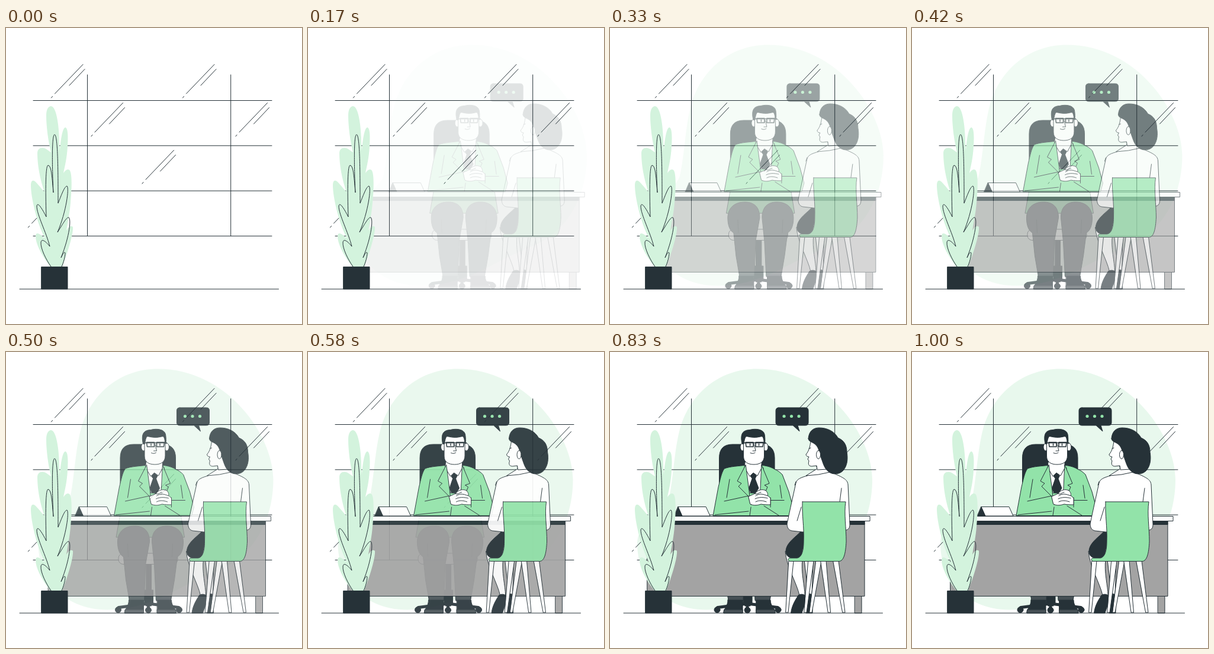
An HTML page that plays this animation: 500x500 px, repeating every 1040 ms.

```html
<!DOCTYPE html>
<html lang="en">
<head>
<meta charset="utf-8">
<title>Office meeting</title>
<style>
  html, body { margin: 0; height: 100%; overflow: hidden; background: #fff; }
  svg { display: block; width: 100vw; height: 100vh; }
  svg { stroke: #263238; stroke-linecap: round; stroke-linejoin: round; fill: none; }
  .dark { fill: #263238; }
  .white { fill: #fff; }
  .green { fill: #92e3a9; }
  .grey { fill: #a3a3a3; }
  .trousers { fill: #465055; }
  .flat { stroke: none; }
</style>
</head>
<body>
<svg viewBox="0 0 500 500">
  <defs>
    <path id="glint" d="M130 61.500L82.500 111M133 69.500L107 97M78.500 115.500L76.500 118"/>
  </defs>

  <g class="slide">
    <path class="flat" fill="#e8f8ed" d="M250 28.500C188 28.500 138 68 120 130C110 168 109 215 101 250C92 278 48 285 48 325C48 375 85 435.500 165 435.500C240 435.500 285 395 350 370C412 345 445 285 445 215C445 142 368 28.500 250 28.500Z"/>
  </g>

  <g id="window">
    <path d="M46 122.500H449M46 198.800H449M46 275.100H449M46 351.400H449M137.500 79V351M379.700 79V351"/>
    <use href="#glint"/>
    <use href="#glint" x="222"/>
    <use href="#glint" x="67.500" y="65"/>
    <use href="#glint" x="311.500" y="65"/>
    <use href="#glint" x="153.500" y="145"/>
    <use href="#glint" x="-39" y="219"/>
  </g>

  <g class="slide" id="man">
    <!-- office chair -->
    <path class="dark" d="M186.500 235V179Q186.500 156 209 156H257Q280 156 280 179V235Z"/>
    <rect class="white" x="183.500" y="340" width="100" height="18.500" rx="8"/>
    <path class="dark" d="M230 358.500H239V429H230ZM227 402H242V424H227Z"/>
    <path stroke-width="5" d="M234 425L184 431.500M234 425L285 431.500M234 424V433"/>
    <g class="dark">
      <circle cx="183" cy="435.500" r="5"/><circle cx="234" cy="436" r="5"/><circle cx="286" cy="435.500" r="5"/>
    </g>
    <!-- coat, trousers, shoes -->
    <path class="green" d="M187 270L179.500 313H295L288 270Z"/>
    <path class="trousers" d="M236 320C236 302 226 294 211 294C192 294 182 305 182 321C182 334 186 343 192 346L196 385L202 420H227L229 360Z"/>
    <path class="trousers" d="M240 320C240 302 250 294 265 294C283 294 293 305 293 321C293 334 289 343 283 346L278 385L272 420H247L244 360Z"/>
    <path d="M199 324L200 346M275 324L274 346"/>
    <path class="dark" d="M201 419H226V441H194C194 433 201 430 201 419Z"/>
    <path class="dark" d="M249 419H273C273 430 281 433 281 441H249Z"/>
    <path class="trousers" d="M195 435H226V441H194ZM249 435H280L281 441H249Z"/>
    <path class="green" d="M232 191C219 193 205 193 195 197C190 204 188 216 185 228L176 276.500H307L311 262L304 236L293 207C289 203 285 200 280 198C272 193 264 192 256 191Z"/>
    <!-- shirt and tie -->
    <path class="white" d="M232 191L229 196L238 238L258 238L261 196L257 191Z"/>
    <path class="dark" d="M239 209L244 204.500L249.500 209L247 214L253 230L248 238H240L236.500 230L242 214Z"/>
    <path class="white" d="M230 186L229 195L238 210L244 204L251 209L258 196V186Z"/>
    <path class="green" d="M231 191L217 218L224 222L219 227L238 246L237 235Z"/>
    <path class="green" d="M258 191L271 222L263 225L268 228L262 242L256 236Z"/>
    <path d="M204 215L199 246M195 252L236 243L240 258M179 275L236 269M273 246V262M273 250.500H296M289 225L292 247M262 260L287 276M240 262L238 276"/>
    <!-- clasped hands -->
    <path class="white" d="M236 244L247 239C251 233 259 231 265 234C268 237 269 240 268 242L273 247V258C268 258 262 258 257 257C251 259 245 260 239 257Z"/>
    <path d="M248 243C253 239 259 239 268 243M247 248C253 245 261 245 268 247M248 253C254 250 260 251 266 253M246 239C251 242 253 237 257 237"/>
    <!-- head -->
    <g class="white">
      <ellipse cx="226" cy="160.500" rx="4" ry="6.500"/>
      <ellipse cx="265" cy="160.500" rx="4" ry="6.500"/>
      <path d="M227.500 143V176C227.500 186 235 190 245 190C255 190 262.500 186 262.500 175V143Z"/>
    </g>
    <path class="dark" d="M225 155C222 141 224 132 238 131.500C247 129 261 130 263 139C264 145 264 150 263.500 155L262 153C262 148 261 145 259 142C248 146 238 144 232 142C229 146 229 150 228 155Z"/>
    <path stroke-width="1.600" d="M226 153.500H265M231 152.500H244V160H232ZM248 152.500H261L260 160H248Z"/>
    <path stroke-width="1.500" d="M238.500 155V158M253.500 155V158"/>
    <path d="M245.500 156L248 167L243 167M239 170.500C242 172 245 171.500 247 170"/>
  </g>

  <g class="slide" id="desk">
    <rect class="grey" x="415.500" y="412" width="11.500" height="29"/>
    <rect class="grey" x="65" y="286" width="367" height="126.500"/>
    <rect class="dark" x="65" y="286" width="367" height="5.500"/>
    <rect class="white" x="56" y="277.500" width="385" height="8"/>
    <path class="white" d="M117 261.500H164L171 277H124Z"/>
    <path class="dark" d="M117 261.500L124 277H110.500Z"/>
  </g>

  <g class="slide" id="woman">
    <!-- legs and chair legs -->
    <g class="white">
      <path d="M330 350L337 411H343L345 350Z"/>
      <path d="M298 337C300 362 318 392 322 411H331C331 395 324 372 327 350Z"/>
    </g>
    <path class="dark" d="M333 412C336 407 342 408 344 411V441H333C331 430 332 420 333 412Z"/>
    <path class="dark" d="M320 411C324 408 330 409 332 412C334 424 328 433 326 441H307.500C309 428 315 419 320 411Z"/>
    <g class="white">
      <path d="M304 353H312L303 440H299Z"/>
      <path d="M337 353H346L334 440H330Z"/>
      <path d="M350 353H359L343 440H339Z"/>
      <path d="M358 353H367L374.500 440H370.500Z"/>
      <path d="M379 353H388L399 440H395Z"/>
    </g>
    <path class="dark" d="M328 299C319 311 299 321 299 337C299 347 308 350 324 348L332 310Z"/>
    <!-- blouse -->
    <path class="white" d="M350 190L352 198L335 209C325 212 318 214 316 221L307 262L301 290C301 297 304 301 309 302L327 304L400 301C405 300 407 297 407 291L404 224C403 216 398 213 380 205L368 195Z"/>
    <path d="M393 230L390 253M316 219L314 225M325 262L318 285"/>
    <path class="white" d="M352 197L333 209L354 207L373 203L380 205L368 194Z"/>
    <!-- head -->
    <path class="white" d="M341 150C340 158 339 166 333 173C333 176 336 177 338 177L336 181L338 184C336 190 338 193 343 193L351 192L352 199L370 198L364 150Z"/>
    <path class="dark" d="M337 146C338 133 346 128 355 128C369 128 381 134 387 145C397 149 402 157 402 169C404 180 403 192 396 200C390 207 378 208 371 202C364 197 362 188 359 180L355 167C353 160 350 156 344 153C339 151 337 149 337 146Z"/>
    <ellipse class="white" cx="354" cy="173.500" rx="3.500" ry="7"/>
    <path d="M338 163L341 162"/>
    <!-- chair -->
    <path class="green" d="M327 253H400C397 273 401 298 401 320C400 340 397 353 389 353.500H306C302 353 302 348 306 348H318C325 347 329 338 329 320C330 295 326 275 327 253Z"/>
  </g>

  <g class="slide" id="bubble">
    <path class="dark" d="M287 94H332Q337 94 337 99V119Q337 124 332 124H319L322 134L311 124H287Q282 124 282 119V99Q282 94 287 94Z"/>
    <g class="green flat">
      <circle cx="296" cy="108.500" r="2.600"/><circle cx="308.500" cy="108.500" r="2.600"/><circle cx="321" cy="108.500" r="2.600"/>
    </g>
  </g>

  <g id="plant">
    <path class="flat" fill="#d3f3dd" d="M75 403C66 392 50 368 50 351C50 346 54 346 58 349C61 351 64 354 66 355C52 330 42 285 42 266C42 257 46 256 50 260C56 266 61 273 65 277C57 255 53 230 53 212C53 202 61 201 67 204C72 207 74 209 76 210C71 190 68 165 68 148C68 135 73 132 76 132C85 132 90 165 90 195L91 208C92 192 95 169 100 168C105 168 105 185 104 200C103 220 99 235 97 245C102 238 106 238 108 241C112 248 111 275 109 295C108 310 104 330 102 342C106 335 110 333 113 336C114 345 107 372 95 403Z"/>
    <path d="M76 403C68 392 58 372 59 362C60 355 67 360 74 369C68 345 52 315 52 301C53 293 60 303 68 319C67 290 66 232 71 232C77 232 78 255 80 278C78 240 77 180 82 180C88 180 88 250 88 296C94 281 99 267 103 267C107 270 102 310 87 345C95 333 102 319 106 320C110 323 108 350 93 388C96 381 99 377 100 380C100 386 97 397 94 403"/>
    <rect class="dark" x="60" y="403.500" width="44" height="37.500"/>
  </g>
  <path d="M23 441H460.500"/>
</svg>
<script>
  const LOOP = 1040, DURATION = 1000, STEP = DURATION / 24, SHIFT = 30;
  const layers = document.querySelectorAll('.slide');

  const bezier = (a, b, u) => 3 * (1 - u) ** 2 * u * a + 3 * (1 - u) * u * u * b + u ** 3;

  // cubic-bezier(.36, -.01, .5, 1.38): slow start, slight overshoot
  function ease(x) {
    let lo = 0, hi = 1;
    for (let i = 0; i < 24; i++) {
      const mid = (lo + hi) / 2;
      if (bezier(.36, .5, mid) < x) lo = mid; else hi = mid;
    }
    return bezier(-.01, 1.38, hi);
  }

  function draw() {
    // 24 poses a second, each taken at the middle of its step; 6 ms absorbs rounded step times
    const step = Math.floor((performance.now() % LOOP + 6) / STEP);
    const p = ease(Math.min((step + .5) * STEP / DURATION, 1));
    for (const layer of layers) {
      layer.setAttribute('transform', `translate(${SHIFT * (1 - p)})`);
      layer.setAttribute('opacity', Math.max(0, Math.min(1, p)));
    }
    requestAnimationFrame(draw);
  }
  draw();
</script>
</body>
</html>
```
